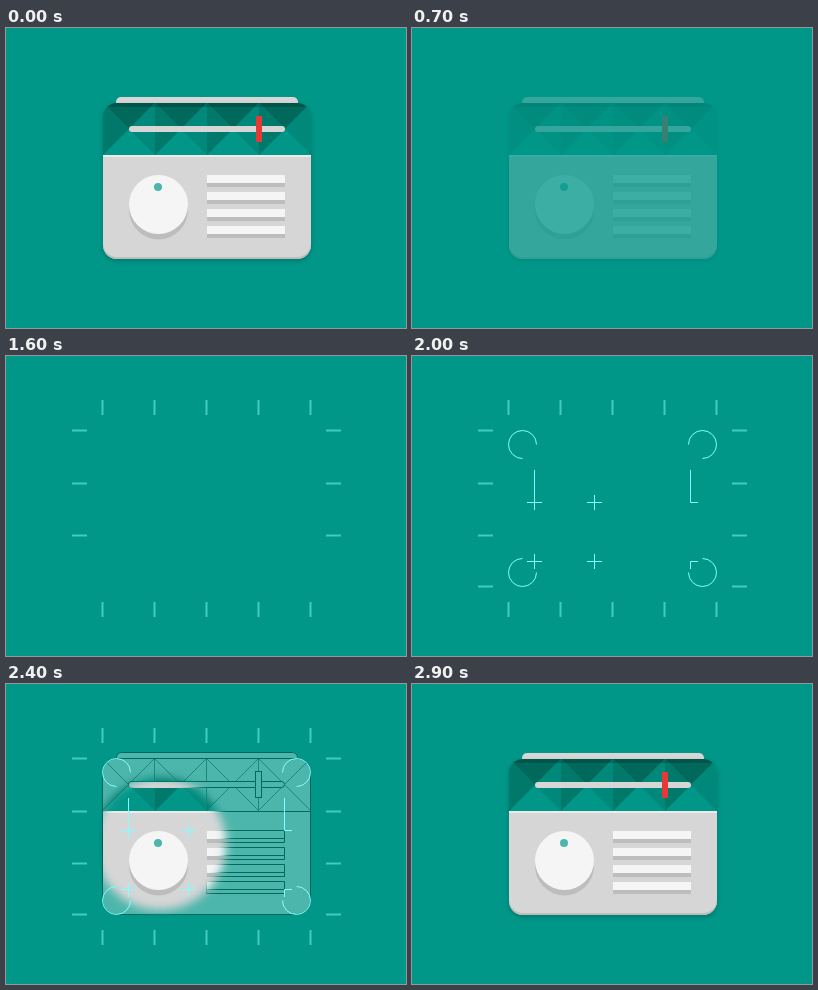
Recreate the animation shown at these times as an HTML page. Size 400x300 px, loop 3900 ms.

```html
<!DOCTYPE html>
<html lang="en">
<head>
<meta charset="utf-8">
<title>Radio icon construction</title>
<style>
  html, body { margin: 0; width: 100%; height: 100%; overflow: hidden; background: #009688; }
  svg { display: block; width: 100%; height: 100%; }

  .art, .spot, .wire, .guides, .guides > * { animation: 3900ms step-end infinite; }
  .art { animation-name: fade; }
  .spot { animation-name: reveal; }
  .wire { animation-name: wire; }
  .guides { animation-name: guides; fill: none; stroke: #84ffff; }
  /* Each guide switches on at its own time; the group switches all of them off. */
  .guides > * { animation-name: appear; animation-delay: calc(var(--at) * 1ms - 3900ms); }

  .body { filter: drop-shadow(0 2px 2px rgba(0, 0, 0, .2)); }
  .wire { fill: none; stroke: #00695c; }
  .wire .fill { fill: #4db6ac; }
  .facets { opacity: .6; }

  @keyframes fade {
    0% { opacity: 1; }
    12.82% { opacity: .75; }
    15.38% { opacity: .5; }
    17.94% { opacity: .25; }
    20.51%, 100% { opacity: 1; }
  }
  @keyframes reveal {
    0% { r: 400px; }
    20.51% { r: 0px; }
    58.97% { r: 33px; }
    61.53% { r: 66px; }
    64.1% { r: 99px; }
    66.66% { r: 132px; }
    69.23%, 100% { r: 400px; }
  }
  @keyframes wire {
    0% { opacity: 0; }
    53.84% { opacity: 1; }
    69.23%, 100% { opacity: 0; }
  }
  @keyframes guides {
    0% { opacity: 0; }
    20.51% { opacity: 1; }
    74.35%, 100% { opacity: 0; }
  }
  @keyframes appear {
    0% { opacity: 1; }
    55%, 100% { opacity: 0; }
  }
</style>
</head>
<body>
<svg viewBox="0 0 400 300">
  <defs>
    <clipPath id="shell"><rect x="97" y="75" width="208" height="156" rx="14"/></clipPath>
    <filter id="soft" filterUnits="userSpaceOnUse" x="0" y="0" width="400" height="300">
      <feGaussianBlur stdDeviation="5"/>
    </filter>
    <mask id="light" maskUnits="userSpaceOnUse" x="0" y="0" width="400" height="300">
      <circle class="spot" cx="154" cy="160" r="400" fill="#fff" filter="url(#soft)"/>
    </mask>
    <g id="cell">
      <path fill="#00695c" d="M0 0H52L26 26z"/>
      <path fill="#00796b" d="M0 0V52L26 26z"/>
      <path fill="#00897b" d="M52 0V52L26 26z"/>
    </g>
    <g id="bar">
      <path fill="#bdbdbd" d="M201 155h78v4h-78z"/>
      <path fill="#f5f5f5" d="M201 147h78v8h-78z"/>
    </g>
    <path id="barLine" d="M200.5 146.5h78v8h-78zM200.5 154.5v4h78v-4"/>
    <path id="ring" d="M124.5 88.5A14 14 0 1 0 110.5 102.5"/>
    <path id="cross" d="M-7.5 0h15M0 -7.5v15"/>
    <path id="column" d="M0 44v15M0 246v15"/>
    <path id="row" d="M66 0h15M320 0h15"/>
  </defs>

  <rect width="400" height="300" fill="#009688"/>

  <g class="wire">
    <path class="fill" d="M110.5 74.5v-1a5 5 0 0 1 5 -5h171a5 5 0 0 1 5 5v1"/>
    <rect class="fill" x="96.5" y="74.5" width="208" height="156" rx="14"/>
    <g class="facets" clip-path="url(#shell)">
      <path d="M96.5 74.5l52 52l52 -52l52 52l52 -52M96.5 126.5l52 -52l52 52l52 -52l52 52"/>
      <path d="M148.5 75v52M200.5 75v52M252.5 75v52"/>
    </g>
    <path d="M96.5 127.5h208"/>
    <rect class="fill" x="122.5" y="97.5" width="156" height="6" rx="3"/>
    <rect class="fill" x="249.5" y="87.5" width="6" height="26"/>
    <circle cx="152.5" cy="181.5" r="29.5"/>
    <circle class="fill" cx="152.5" cy="176.5" r="29.5"/>
    <circle cx="152" cy="159" r="4"/>
    <use href="#barLine"/>
    <use href="#barLine" y="17"/>
    <use href="#barLine" y="34"/>
    <use href="#barLine" y="51"/>
  </g>

  <g mask="url(#light)">
    <g class="art">
      <path fill="#d6d6d6" d="M110 75v-1a5 5 0 0 1 5 -5h172a5 5 0 0 1 5 5v1z"/>
      <rect class="body" x="97" y="75" width="208" height="156" rx="14" fill="#009688"/>
      <g clip-path="url(#shell)">
        <use href="#cell" x="97" y="75"/>
        <use href="#cell" x="149" y="75"/>
        <use href="#cell" x="201" y="75"/>
        <use href="#cell" x="253" y="75"/>
        <path fill="#000" fill-opacity=".2" d="M97 75h208v4H97z"/>
        <path fill="#d6d6d6" d="M97 127h208v104H97z"/>
        <path fill="#ebebeb" d="M97 127h208v2H97z"/>
        <path fill="#bdbdbd" d="M97 215v16h208v-16a14 14 0 0 1 -14 14H111a14 14 0 0 1 -14 -14z"/>
      </g>
      <rect x="123" y="98" width="156" height="6" rx="3" fill="#d6d6d6"/>
      <rect x="250" y="88" width="6" height="26" fill="#e53935"/>
      <circle cx="152.5" cy="182" r="29.5" fill="#bdbdbd"/>
      <circle cx="152.5" cy="176.5" r="29.5" fill="#f5f5f5"/>
      <circle cx="152" cy="159" r="4" fill="#4db6ac"/>
      <use href="#bar"/>
      <use href="#bar" y="17"/>
      <use href="#bar" y="34"/>
      <use href="#bar" y="51"/>
    </g>
  </g>

  <g class="guides">
    <use href="#column" x="96.5" style="--at:900"/>
    <use href="#column" x="148.5" style="--at:1000"/>
    <use href="#column" x="200.5" style="--at:1100"/>
    <use href="#column" x="252.5" style="--at:1200"/>
    <use href="#column" x="304.5" style="--at:1300"/>
    <use href="#row" y="74.5" style="--at:1400"/>
    <use href="#row" y="127.5" style="--at:1500"/>
    <use href="#row" y="179.5" style="--at:1600"/>
    <use href="#row" y="230.5" style="--at:1700"/>
    <g style="--at:1800">
      <use href="#ring"/>
      <use href="#ring" transform="matrix(-1 0 0 1 401 0)"/>
      <use href="#ring" transform="matrix(1 0 0 -1 0 305)"/>
      <use href="#ring" transform="matrix(-1 0 0 -1 401 305)"/>
    </g>
    <g style="--at:1900">
      <use href="#cross" x="122.5" y="146.5"/>
      <use href="#cross" x="182.5" y="146.5"/>
      <use href="#cross" x="122.5" y="205.5"/>
      <use href="#cross" x="182.5" y="205.5"/>
    </g>
    <path style="--at:2000" d="M122.5 114v25M278.5 114v32.5h7.5M286 205.5h-7.5v7.5"/>
  </g>
</svg>
</body>
</html>
```
